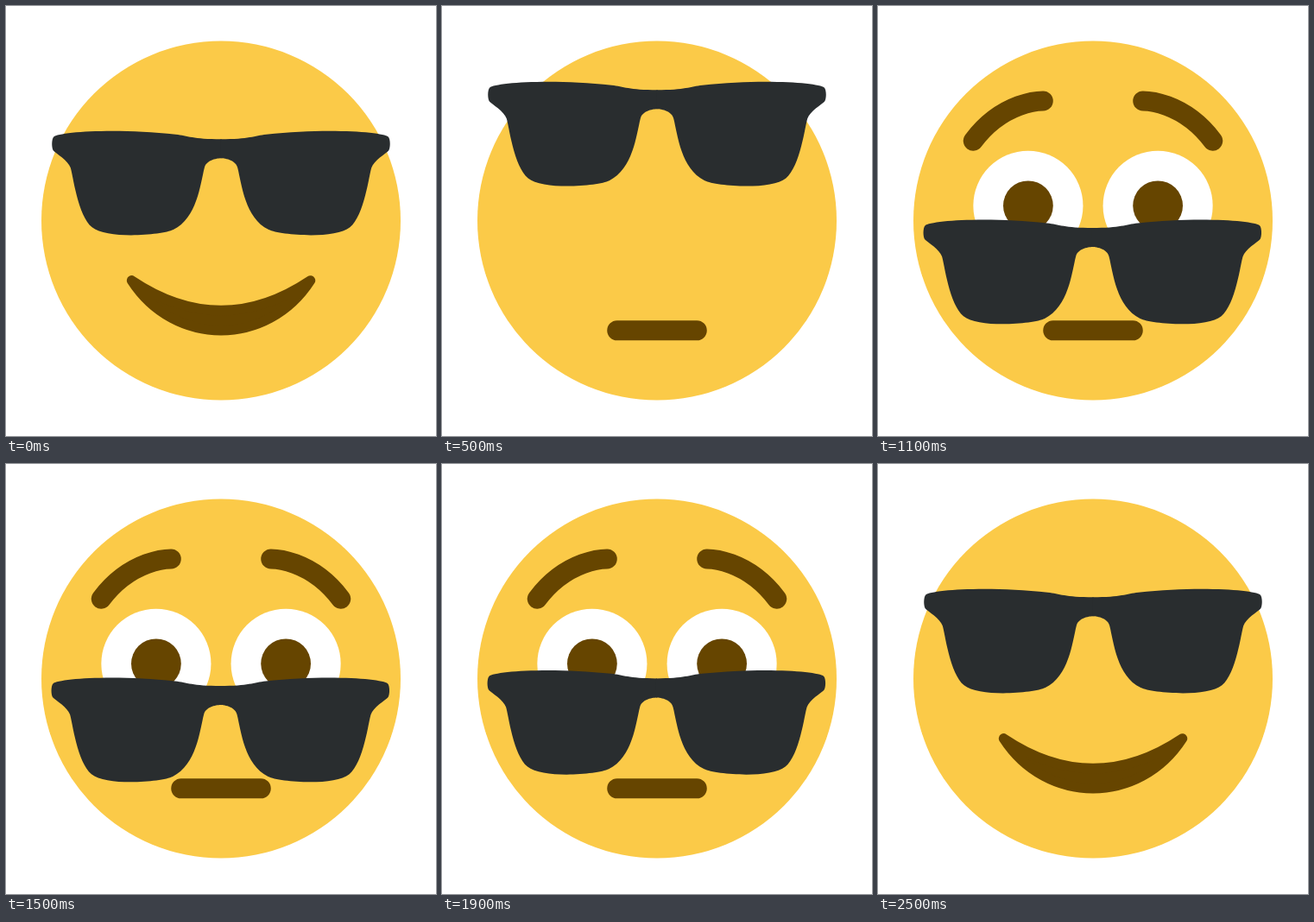
Animation, 498 px wide and 498 px high, one loop 2600 ms. Source, as an HTML page:

```html
<!DOCTYPE html>
<html lang="en">
<head>
<meta charset="utf-8">
<title>Sunglasses face</title>
<style>
  html, body { margin: 0; width: 100%; height: 100%; overflow: hidden; background: #fff; }
  svg { display: block; width: 100%; height: 100%; }
  .line { stroke: #664500; stroke-width: 2; stroke-linecap: round; stroke-linejoin: round; }
</style>
</head>
<body>
<svg viewBox="0 0 498 498">
  <defs>
    <clipPath id="reveal"><rect id="curtain" width="36" height="0"/></clipPath>
    <g id="eye">
      <path class="line" fill="none" d="M6 10C9 6 12.85 6 13 6"/>
      <circle cx="11.5" cy="16.5" r="5.5" fill="#fff"/>
      <circle cx="11.5" cy="16.5" r="2.5" fill="#664500"/>
    </g>
    <!-- Left half: top edge, hinge, lens, bridge -->
    <path id="lens" fill="#292d2f" d="M18.05 9.83C15.14 9.83 14.68 9.48 13.46 9.35
      C7.38 8.68 1.72 9.11 1.24 9.59C1 9.82 1 10.78 1.24 11.02
      C1.48 11.26 2.68 11.98 2.92 12.69C3.16 13.41 3.64 17.48 5.08 18.67
      C6.56 19.91 12.15 19.45 13.22 18.91C15.62 17.72 15.91 14.38 16.34 12.69
      C16.58 11.74 18.05 11.74 18.05 11.74Z"/>
  </defs>
  <g transform="translate(41 40.6) scale(11.556)">
    <circle cx="18" cy="18" r="18" fill="#fbca48"/>
    <path id="mouth" class="line" fill="#664500"/>
    <g id="eyes" clip-path="url(#reveal)">
      <use href="#eye"/>
      <use href="#eye" transform="translate(36) scale(-1 1)"/>
    </g>
    <g id="glasses">
      <use href="#lens"/>
      <use href="#lens" transform="translate(36) scale(-1 1)"/>
    </g>
  </g>
</svg>
<script>
  const LOOP = 2600, STEP = 100;
  const RAISED = -4.93, LOWERED = 8.9;
  const byId = id => document.getElementById(id);
  const mouth = byId('mouth'), eyes = byId('eyes');
  const glasses = byId('glasses'), curtain = byId('curtain');

  const mix = (a, b, k) => a + (b - a) * k;
  const ease = k => k < 0.5 ? 4 * k ** 3 : 1 - 4 * (1 - k) ** 3;
  const phase = (t, from, to) => ease(Math.min(1, Math.max(0, (t - from) / (to - from))));

  // Symmetric curve from one corner to the other, hanging down by sag
  const hang = (from, to, y, bend, sag) => {
    const low = y + sag * 4 / 3;
    return `C${mix(18, from, bend)} ${low} ${mix(18, to, bend)} ${low} ${to} ${y}`;
  };

  function drawMouth(flat) {
    const half = mix(8.95, 4, flat), y = mix(24, 29, flat);
    const left = 18 - half, right = 18 + half;
    const upper = hang(left, right, y, 1 / 3, mix(3, 0, flat));
    const lower = hang(right, left, y, 0.52, mix(5, 0, flat));
    mouth.setAttribute('d', `M${left} ${y}${upper}${lower}Z`);
    mouth.style.strokeWidth = mix(1, 2, flat);
  }

  function draw(t) {
    const flat = phase(t, 100, 500) - phase(t, 2200, 2500);
    const down = phase(t, 500, 1000) - phase(t, 1800, 2220);
    const drop = RAISED * flat + (LOWERED - RAISED) * down;
    drawMouth(flat);
    glasses.setAttribute('transform', `translate(${-0.06 * down} ${drop})`);
    // The glasses uncover the eyes as they slide down
    curtain.setAttribute('height', 10.5 + drop);
    eyes.setAttribute('visibility', t > 500 && t < 2200 ? 'visible' : 'hidden');
  }

  const begin = performance.now();
  function tick() {
    const t = (performance.now() - begin) % LOOP;
    draw(Math.floor(t / STEP) * STEP);
    requestAnimationFrame(tick);
  }
  tick();
</script>
</body>
</html>
```
